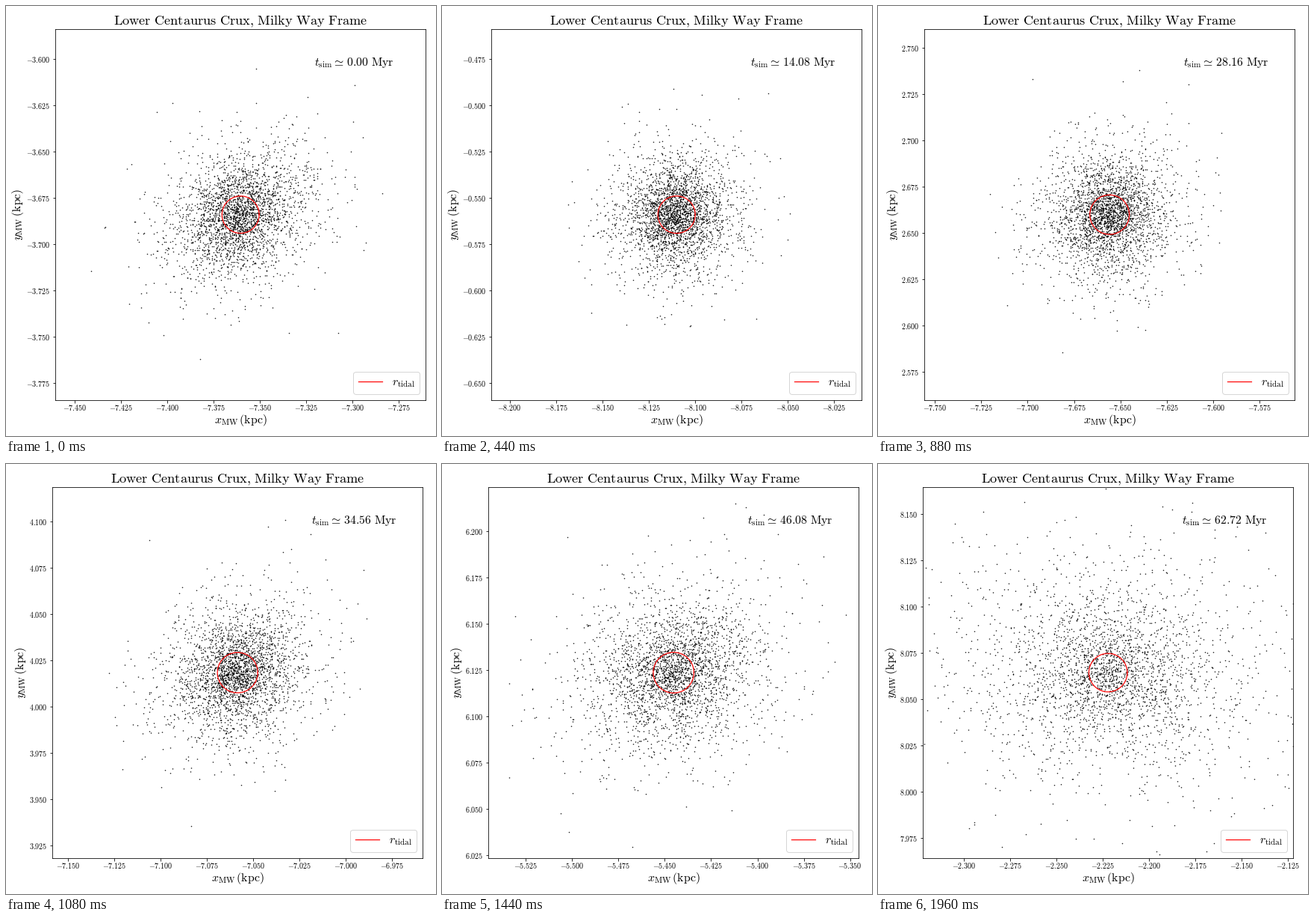
These frames come from a looping animation (576 by 576 pixels, 2000 ms). A matplotlib script:

```python
import numpy as np
import matplotlib.pyplot as plt
from matplotlib.animation import FuncAnimation
from matplotlib.ticker import FuncFormatter, MultipleLocator

plt.rcParams["mathtext.fontset"] = "cm"

SIZE, DPI = 576, 72
SIDE, BOTTOM = 496.2, 527.6      # axes side and lower edge, px
HALF, STEP = 0.1, 0.025          # half view and tick step, kpc
KPC = 2 * HALF / SIDE            # kpc per px
FRAMES, MYR = 50, 1.28
N = 2800

rng = np.random.default_rng(7)
start = rng.normal(size=(2, N))
drift = rng.normal(size=(2, N))
depth = rng.uniform(size=N) ** 0.7     # 0 in the core, 1 in the halo
rate = 0.08 - 0.05 * depth


def centre(i):
    """Cluster centre in kpc: an epicycle around a circular galactic orbit."""
    q = max(i, 0.05) - 19.625          # the first snapshot is slightly late
    r = 8.4063 - 0.3037 * np.cos(0.0488 * q)
    angle = 0.247186 + 0.034097 * q + 0.05364 * np.sin(0.0488 * q)
    return -r * np.cos(angle), r * np.sin(angle)


def tidal_radius(i):
    return (26 - 1.3 * np.cos(2 * np.pi * (i - 5) / 56)) * KPC


def stars(i):
    """Star offsets in kpc: bound orbits in a halo that the tide stretches."""
    u, v = start * np.cos(rate * i) + drift * np.sin(rate * i)
    tilt = 0.1 + 0.13 * np.cos(2 * np.pi * i / 32)
    v = tilt * u + np.sqrt(1 - tilt**2) * v
    tide = (i - 13) ** 2
    wide = 14 + (42 + 0.065 * tide) * depth
    tall = 14 + (42 + 0.035 * tide) * depth
    return wide * u * KPC, tall * v * KPC


fig = plt.figure(figsize=(SIZE / DPI, SIZE / DPI), dpi=DPI, facecolor="white")
ax = fig.add_axes([0.1, 0.1, 0.8, 0.8])
for axis in (ax.xaxis, ax.yaxis):
    axis.set_major_locator(MultipleLocator(STEP))
    axis.set_major_formatter(FuncFormatter(lambda v, _: f"${round(v, 3) + 0.0:.3f}$"))
ax.tick_params(labelsize=10)
ax.tick_params(axis="x", pad=1.3)
ax.set_title(r"$\mathrm{Lower\ Centaurus\ Crux{,}\ Milky\ Way\ Frame}$",
             fontsize=18.3, pad=6)


def label(x, y, text, **kw):
    return ax.text(x, y, text, transform=ax.transAxes, fontsize=15.8,
                   va="baseline", rotation_mode="anchor", **kw)


label(0.5, -31 / SIDE, r"$x_{\mathrm{MW}}\,(\mathrm{kpc})$", ha="center")
y_label = label(0, 0.5, r"$y_{\mathrm{MW}}\,(\mathrm{kpc})$", ha="center", rotation=90)
clock = label(0.7, 0.903, "")

dots, = ax.plot([], [], "k.", ms=1)
ring, = ax.plot([], [], color="red", lw=1.2, label=r"$r_{\mathrm{tidal}}$")
ax.legend(loc="lower right", fontsize=16)
turn = np.linspace(0, 2 * np.pi, 100)


def place_axes(cx, cy):
    """Shift the axes to make room for the tick labels."""
    negative = np.ceil((cy - HALF) / STEP) < 0
    gap = (cx + HALF) % STEP / KPC
    shift = 0.5 * max(0, 11.3 - gap)
    left = (66.1 if negative else 62.1) - shift
    ax.set_position([left / SIZE, 1 - BOTTOM / SIZE, SIDE / SIZE, SIDE / SIZE])
    y_label.set_x((-46 if negative else -38.2) / SIDE)


def update(i):
    cx, cy = centre(i)
    place_axes(cx, cy)
    ax.set_xlim(cx - HALF, cx + HALF)
    ax.set_ylim(cy - HALF, cy + HALF)
    x, y = stars(i)
    dots.set_data(cx + x, cy + y)
    r = tidal_radius(i)
    ring.set_data(cx + r * np.cos(turn), cy + r * np.sin(turn))
    clock.set_text(rf"$t_{{\mathrm{{sim}}}}\simeq\, {i * MYR:.2f}\ \mathrm{{Myr}}$")
    return dots, ring, clock


anim = FuncAnimation(fig, update, frames=FRAMES, interval=40,
                     repeat=True, repeat_delay=0, blit=False)
plt.show()
```
